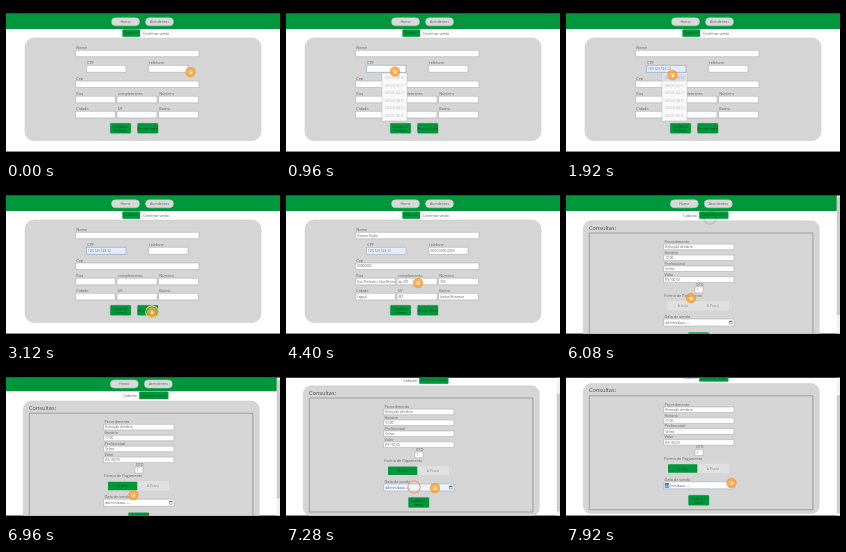
An HTML page with a canvas for the animation above (8000 ms loop, 274 by 154 pixels).

```html
<!DOCTYPE html>
<html lang="pt">
<head>
<meta charset="utf-8">
<style>
html, body { margin: 0; height: 100%; overflow: hidden; background: #000 }
canvas { display: block; width: 100vw; height: 100vh }
</style>
</head>
<body>
<canvas></canvas>
<script>
const W = 274, H = 154, TOP = 7.6, VIEW = 138.2, LOOP = 8000, STEP = 80;
const GREEN = '#00963b', GREY = '#d5d5d5', INK = '#606060', EDGE = '#a0a0a0';
const canvas = document.querySelector('canvas');
const ctx = canvas.getContext('2d');
const ratio = window.devicePixelRatio || 1;
canvas.width = W * ratio;
canvas.height = H * ratio;

// [time, x, y]
const pointer = [
  [0, 184.5, 66], [80, 184.5, 66], [400, 111, 64], [560, 111, 64],
  [1360, 107, 67], [1920, 106.5, 69], [2240, 107, 71], [2880, 146, 124],
  [3360, 146, 124], [3840, 145, 123], [4400, 132, 95], [4640, 117, 122],
  [5040, 117, 122], [5360, 144, 29], [5680, 144, 29], [6080, 125, 110],
  [6400, 117, 117], [6800, 127, 133], [7120, 128, 117], [7280, 149, 118],
  [7680, 165.5, 113], [8000, 165.5, 113]
];
const scrolling = [[0, 0], [6880, 0], [7280, 17], [7680, 19.2], [8000, 19.2]];
// [start, end, x, y, color]
const clicks = [
  [3040, 3360, 146, 124, '#c8dc78'],
  [5360, 6240, 144, 30, 'rgba(0,0,0,.13)'],
  [7040, 7440, 128, 117, '#f0a070']
];

function at(keys, t) {
  const i = Math.max(1, keys.findIndex(k => k[0] > t));
  const a = keys[i - 1], b = keys[i];
  const p = (t - a[0]) / (b[0] - a[0]);
  const e = p * p * (3 - 2 * p);
  return a.slice(1).map((v, n) => v + (b[n + 1] - v) * e);
}

function box(x, y, w, h, fill, stroke, r = 0, line = .5) {
  ctx.beginPath();
  ctx.roundRect(x, y, w, h, r);
  if (fill) { ctx.fillStyle = fill; ctx.fill(); }
  if (stroke) { ctx.strokeStyle = stroke; ctx.lineWidth = line; ctx.stroke(); }
}

function text(s, x, y, size = 3.8, color = INK, align = 'left') {
  ctx.font = `${size}px "Open Sans", sans-serif`;
  ctx.fillStyle = color;
  ctx.textAlign = align;
  ctx.fillText(s, x, y);
}

function disc(x, y, r, color) {
  ctx.beginPath();
  ctx.arc(x, y, r, 0, 7);
  ctx.fillStyle = color;
  ctx.fill();
}

function field(label, x, y, w, h, value = '', fill = '#fff', edge = EDGE) {
  text(label, x + .8, y - 1.2);
  box(x, y, w, h, fill, edge);
  text(value, x + 1.6, y + h / 2 + 1.2, 3.2);
}

function button(lines, x, y, w, h) {
  box(x, y, w, h, GREEN, '#0a8a3a', .8, .3);
  lines.forEach((s, i) => text(s, x + w / 2, y + h / 2 + 1.2 + (i - (lines.length - 1) / 2) * 4, 3.2, '#06501f', 'center'));
}

function header(sales) {
  box(0, TOP, W, 23 - TOP, GREEN);
  ['Home', 'Atendentes'].forEach((s, i) => {
    const x = (sales ? 118.3 : 119.5) + i * 34;
    box(x - 14, 11.8, 28, 8, '#d9d9d9', '#b8c8bc', 4);
    text(s, x, 17.1, 3.6, INK, 'center');
  });
  if (sales) {
    text('Cadastro', 117.3, 28.5, 3.3);
    button(['Confirmar venda'], 133.3, 23.5, 29, 7.3);
  } else {
    button(['Cadastro'], 116.5, 23.5, 17.5, 7.3);
    text('Confirmar venda', 137, 28.5, 3.3);
  }
}

function registration(t) {
  header(false);
  box(19, 32, 236, 102.5, GREY, '#c4c4c4', 9);
  const full = t >= 3680 && t < 4880;
  const val = s => full ? s : '';
  const picked = t >= 1680 && t < 4880;
  const focus = t >= 320 && t < 3680;
  field('Nome', 69.5, 44.3, 123.5, 6.4, val('Vicente Prado'));
  field('CPF', 80.5, 59.3, 39.5, 7, picked ? '123.123.123-12' : '',
    picked ? '#e5eefc' : '#fff', focus ? '#6a8db9' : EDGE);
  field('telefone', 142.5, 59.3, 39.5, 7, val('(00) 0 0000-0000'));
  field('Cep', 69.5, 75, 123.5, 6.5, val('00000000'));
  const cells = [
    ['Rua', 'Rua Professor Caio Bento'], ['complemento', 'ap 301'], ['Número', '300'],
    ['Cidade', 'Lagual'], ['UF', 'MT'], ['Bairro', 'Jardim Brisamar']
  ];
  cells.forEach(([name, v], i) =>
    field(name, 69.5 + i % 3 * 41.5, i < 3 ? 90.2 : 105.3, 40, 6.6, val(v)));
  button(['Cadastrar', 'Paciente'], 104.3, 117.3, 20.5, 10);
  button(['Buscar cliente'], 131.5, 117.3, 20.5, 10);
  if (t >= 800 && t < 2240) suggestions(t);
}

function suggestions(t) {
  box(96, 67, 25, 48, '#fafafa', '#b5b5b5');
  if (t >= 1440) box(96.3, 67.5, 24.4, 8, '#d9dde8');
  for (let i = 0; i < 6; i++)
    text(`123.123.12${i}-1${i}`, 98.5, 73 + i * 7.6, 2.7, '#a3a3b4');
}

function sales(t) {
  header(true);
  box(17.3, 32.8, 236, 130, GREY, '#c8c8c8', 8);
  text('Consultas:', 23, 41.5, 5.6, '#444');
  box(23.3, 45, 223.6, 114, null, '#777', 0, .6);
  const rows = [['Procedimento', 'Remoção dentária'], ['Horário', '17:00'],
    ['Profissional', 'Selmo'], ['Valor', 'R$ 100,00']];
  rows.forEach(([name, v], i) => field(name, 97.7, 56.1 + i * 10.9, 70.3, 5.6, v));
  field('QTD', 129, 98.8, 8, 6, '1');
  text('Forma de Pagamento', 98.3, 108.9);
  box(101, 112.6, 62.5, 10.2, '#e0e0e0', '#d0d0d0', 1);
  const chosen = t >= 6480;
  if (chosen) box(102, 113.4, 29.3, 8.6, GREEN, null, .6);
  text('À vista', 117, 119, 3.4, chosen ? '#06501f' : '#888', 'center');
  text('À Prazo', 147, 119, 3.4, '#888', 'center');
  dateField(t);
  button(['Confirmar', 'venda'], 122.5, 144.5, 20.5, 10);
}

function dateField(t) {
  const active = t >= 7120, segment = t >= 7600;
  field('Data de venda', 97.7, 131, 70.3, 7, '',
    active && !segment ? '#f0f6fd' : '#fff', active ? '#86a5cc' : EDGE);
  if (segment) box(98.7, 132.2, 4.4, 4.8, '#3476d2');
  text('dd', 99.2, 135.7, 3.2, segment ? '#fff' : INK);
  text('/mm/aaaa --:--', 103.3, 135.7, 3.2);
  box(163.3, 133, 2.8, 3, null, '#444', 0, .4);
  box(163.3, 133, 2.8, .8, '#444');
}

function cursor(t) {
  for (const [start, end, x, y, color] of clicks) {
    if (t < start || t >= end) continue;
    ctx.beginPath();
    ctx.arc(x, y, 6.2, 0, 7);
    ctx.strokeStyle = color;
    ctx.lineWidth = 1.2;
    ctx.stroke();
  }
  const [x, y] = at(pointer, t);
  disc(x, y, 5.2, 'rgba(246,160,55,.83)');
  disc(x, y, 2.6, 'rgba(255,205,135,.55)');
  ctx.beginPath();
  ctx.moveTo(x - .5, y - 1);
  ctx.lineTo(x - .5, y + 2);
  ctx.lineTo(x + 1.6, y + 1.1);
  ctx.closePath();
  ctx.fillStyle = '#fff';
  ctx.fill();
}

function draw(now) {
  const t = Math.floor(now % LOOP / STEP) * STEP;
  ctx.setTransform(canvas.width / W, 0, 0, canvas.height / H, 0, 0);
  box(0, 0, W, H, '#000');
  ctx.save();
  ctx.beginPath();
  ctx.rect(0, TOP, W, VIEW);
  ctx.clip();
  box(0, TOP, W, VIEW, '#fff');
  const [scroll] = at(scrolling, t);
  ctx.save();
  ctx.translate(0, -scroll);
  if (t < 5440) registration(t); else sales(t);
  ctx.restore();
  if (t >= 5440) {
    box(270.8, TOP, 3.2, VIEW, '#f1f1f1');
    box(270.8, 9 + scroll * .85, 3.2, 118, '#cbcbcb');
  }
  cursor(t);
  ctx.restore();
  requestAnimationFrame(draw);
}
requestAnimationFrame(draw);
</script>
</body>
</html>
```
